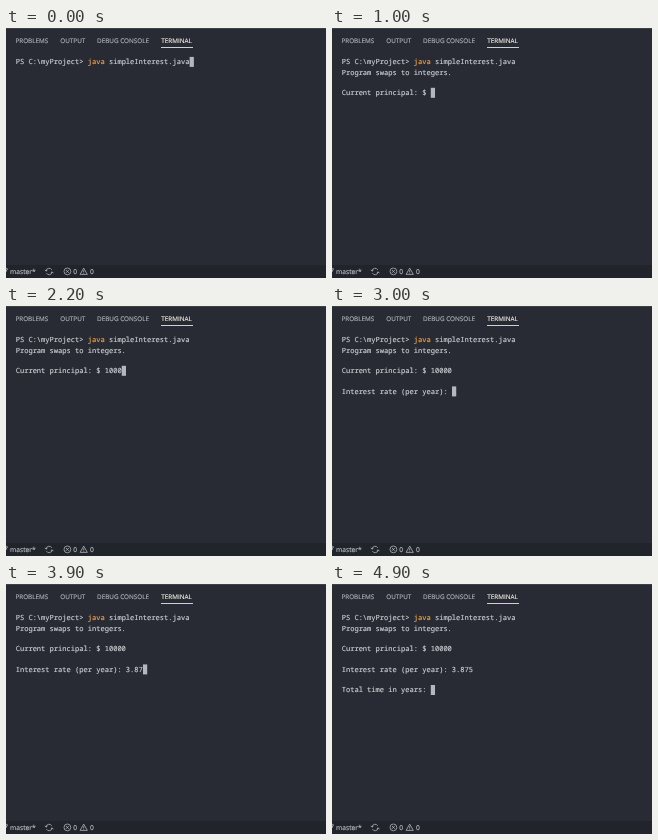
Animation, 320 px wide and 250 px high, one loop 5000 ms. Source, as an HTML page:

```html
<!DOCTYPE html>
<html lang="en">
<head>
<meta charset="utf-8">
<title>Terminal session</title>
<style>
html, body { margin: 0; width: 100%; height: 100%; overflow: hidden; background: #282b33; }
svg { display: block; width: 320px; height: 250px; }
text { white-space: pre; text-rendering: geometricPrecision; stroke-width: .15; }
.ui { font-family: "Open Sans", "Noto Sans", sans-serif; font-size: 6.35px; fill: #adb1b7; stroke: #adb1b7; }
.ui .active { fill: #f3efe4; stroke: #f3efe4; }
.status { font-size: 6.7px; fill: #b8bcc2; stroke: #b8bcc2; }
.mono { font-family: "Noto Sans Mono", "DejaVu Sans Mono", monospace; font-size: 7.07px; fill: #ced1d6; stroke: #ced1d6; }
.mono tspan { fill: #f2a24c; stroke: #f2a24c; }
.icon { fill: none; stroke: #b8bcc2; stroke-width: .75; }
</style>
</head>
<body>
<svg viewBox="0 0 320 250">
  <rect width="320" height="250" fill="#282b33"/>
  <rect width="320" height="1" fill="#3d4046"/>
  <g class="ui">
    <text x="9.4" y="14.7">PROBLEMS</text>
    <text x="54.3" y="14.7">OUTPUT</text>
    <text x="91.1" y="14.7">DEBUG CONSOLE</text>
    <text class="active" x="155.3" y="14.7">TERMINAL</text>
  </g>
  <rect x="155" y="19" width="32" height="1" fill="#cfd0d2"/>

  <rect id="cursor" width="4.24" height="10" fill="#b4b7bf"/>
  <g id="screen" class="mono"></g>

  <rect y="237" width="320" height="13" fill="#21252b"/>
  <g class="ui status">
    <text x="4" y="245.9">master*</text>
    <text x="67.3" y="245.9">0</text>
    <text x="84" y="245.9">0</text>
  </g>
  <g class="icon">
    <circle cx=".6" cy="241.2" r=".9"/>
    <path d="M.6 242.1Q.4 244-.9 245"/>
    <path d="M40 243a3.1 3.1 0 0 1 5.8-1.1M46.2 244a3.1 3.1 0 0 1-5.8 1.1M38.9 241.8l1.1 1.4 1.4-1M47.3 245.2l-1.1-1.4-1.4 1"/>
    <circle cx="61.4" cy="243.4" r="3.4"/>
    <path d="M60 242l2.8 2.8M62.8 242l-2.8 2.8"/>
    <path d="M77.7 240.1l3.6 6.3h-7.2zM77.7 242.2v2.2M77.7 244.9v.7"/>
  </g>
</svg>
<script>
const LOOP = 5000, LEFT = 9.7, TOP = 28.9, CELL = 4.242, PITCH = 10.3, BASE = 7.3;
const prompt = 'PS C:\\myProject> ', command = 'java';

// [time in ms, output added to the terminal]
const steps = [
  [0, prompt + command + ' simpleInterest.java'],
  [200, '\n'],
  [900, 'Program swaps to integers.\n\nCurrent principal: $ '],
  [1500, '1'], [1700, '0'], [1900, '0'], [2100, '0'], [2300, '0'],
  [2700, '\n\nInterest rate (per year): '],
  [3300, '3'], [3500, '.'], [3700, '8'], [3800, '7'], [4000, '5'],
  [4100, '\n\nTotal time in years: ']
];

const screen = document.getElementById('screen');
const cursor = document.getElementById('cursor');
const svg = name => document.createElementNS('http://www.w3.org/2000/svg', name);

const rows = Array.from({ length: 8 }, (_, i) => {
  const row = svg('text');
  row.setAttribute('x', LEFT);
  row.setAttribute('y', TOP + i * PITCH + BASE);
  return screen.appendChild(row);
});

function setRow(row, line) {
  row.textContent = line;
  if (!line.startsWith(prompt)) return;
  const word = svg('tspan');
  word.textContent = command;
  row.replaceChildren(prompt, word, line.slice(prompt.length + command.length));
}

let shown;
function draw(t) {
  const output = steps.filter(([at]) => at <= t).map(([, text]) => text).join('');
  if (output === shown) return;
  shown = output;
  const lines = output.split('\n');
  rows.forEach((row, i) => setRow(row, lines[i] || ''));
  const last = lines.length - 1;
  cursor.setAttribute('x', LEFT + lines[last].length * CELL);
  cursor.setAttribute('y', TOP + last * PITCH);
}

const start = performance.now();
function tick() {
  draw((performance.now() - start) % LOOP);
  requestAnimationFrame(tick);
}
tick();
</script>
</body>
</html>
```
